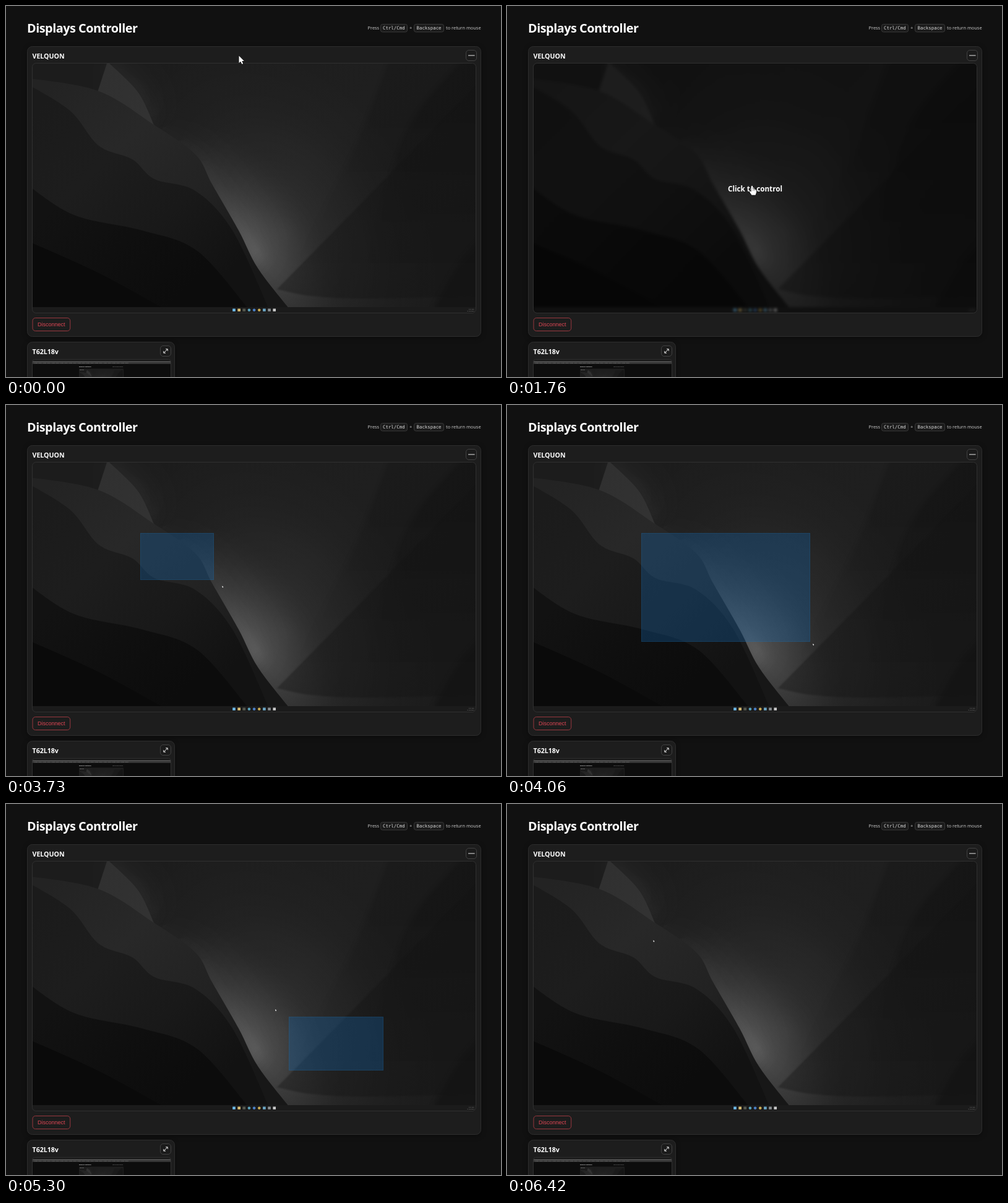
Recreate the animation shown at these times as an HTML page with a canvas. Size 800 px wide and 600 px high, loop 6450 ms.

```html
<!DOCTYPE html>
<html lang="en">
<head>
<meta charset="utf-8">
<title>Displays Controller</title>
<style>
html, body { margin: 0; width: 100%; height: 100%; overflow: hidden; background: #111; }
canvas, svg { position: absolute; left: 0; top: 0; width: 800px; height: 600px; display: block; }
text { font-family: "Noto Sans", "Open Sans", sans-serif; fill: #fff; }
.title { font-size: 19.8px; font-weight: 700; letter-spacing: -.46px; }
.name { font-size: 10.6px; font-weight: 700; }
.hint { font-size: 7.4px; fill: #c4c4c4; }
.key { font: 7.4px "DejaVu Sans Mono", "Noto Sans Mono", monospace; fill: #d8d8d8; }
.danger { font: 9px "Liberation Sans", sans-serif; fill: #dc4654; }
</style>
</head>
<body>
<canvas id="stage" width="800" height="600"></canvas>
<svg viewBox="0 0 800 600">
  <text class="title" x="34" y="43">Displays Controller</text>
  <text class="hint" x="584.5" y="38">Press</text>
  <text class="key" x="609" y="38">Ctrl/Cmd</text>
  <text class="hint" x="652" y="38">+</text>
  <text class="key" x="663.5" y="38">Backspace</text>
  <text class="hint" x="711" y="38">to return mouse</text>
  <text class="name" x="42.5" y="84.7">VELQUON</text>
  <text class="name" x="42.5" y="562.7">T62L18v</text>
  <text class="danger" x="51" y="518">Disconnect</text>
</svg>
<script>
const W = 800, H = 600, LOOP = 6450;
const VIEW = { x: 43, y: 93, w: 717, h: 403 };
const BAR_Y = 487;
const SANS = '"Noto Sans", "Open Sans", sans-serif';
const ctx = document.getElementById('stage').getContext('2d');

function layer(paint) {
  const c = document.createElement('canvas');
  c.width = W;
  c.height = H;
  paint(c.getContext('2d'));
  return c;
}

function box(g, x, y, w, h, r, fill, stroke) {
  g.beginPath();
  g.roundRect(x, y, w, h, r);
  if (fill) { g.fillStyle = fill; g.fill(); }
  if (stroke) { g.strokeStyle = stroke; g.lineWidth = 1; g.stroke(); }
}

function line(g, x0, y0, x1, y1, color, width = 1) {
  g.beginPath();
  g.moveTo(x0, y0);
  g.lineTo(x1, y1);
  g.strokeStyle = color;
  g.lineWidth = width;
  g.stroke();
}

function label(g, text, x, y, size, color, weight = '') {
  g.font = `${weight} ${size}px ${SANS}`;
  g.fillStyle = color;
  g.fillText(text, x, y);
}

function ramp(g, x0, y0, x1, y1, ...colors) {
  const grad = g.createLinearGradient(x0, y0, x1, y1);
  colors.forEach((c, i) => grad.addColorStop(i / (colors.length - 1), c));
  return grad;
}

// Smooth curve through a few points.
function curve(...pts) {
  const at = i => pts[Math.max(0, Math.min(pts.length - 1, i))];
  const path = new Path2D();
  path.moveTo(...pts[0]);
  for (let i = 0; i < pts.length - 1; i++) {
    const [a, b, c, d] = [at(i - 1), at(i), at(i + 1), at(i + 2)];
    path.bezierCurveTo(b[0] + (c[0] - a[0]) / 6, b[1] + (c[1] - a[1]) / 6,
      c[0] - (d[0] - b[0]) / 6, c[1] - (d[1] - b[1]) / 6, ...c);
  }
  return path;
}

// Fills the ground between a curve and one side of the stage.
function hill(g, path, side, fill, blur = 0) {
  const shape = new Path2D(path);
  shape.lineTo(side, 500);
  if (side > 400) shape.lineTo(side, 90);
  shape.closePath();
  g.filter = blur ? `blur(${blur}px)` : 'none';
  g.fillStyle = fill;
  g.fill(shape);
  g.filter = 'none';
}

// Light that spills from a ridge, in ever wider and weaker bands.
function spill(g, path, light) {
  for (let i = 0; i < 3; i++) {
    g.filter = `blur(${10 * 2 ** i}px)`;
    g.lineWidth = 14 * 2 ** i;
    g.strokeStyle = light;
    g.stroke(path);
  }
  g.filter = 'none';
}

function glow(g, x, y, rx, ry, level) {
  g.save();
  g.translate(x, y);
  g.rotate(Math.PI / 3);
  g.scale(rx, ry);
  const grad = g.createRadialGradient(0, 0, 0, 0, 0, 1);
  for (let i = 0; i <= 10; i++) {
    grad.addColorStop(i / 10, `rgba(255,255,255,${(level * (1 - i / 10) ** 1.6).toFixed(4)})`);
  }
  g.fillStyle = grad;
  g.fillRect(-1, -1, 2, 2);
  g.restore();
}

function wallpaper(g) {
  g.fillStyle = ramp(g, 230, 94, 700, 480, '#1c1c1c', '#1f1f1f', '#1b1b1b');
  g.fillRect(0, 0, W, H);
  const veil = a => ramp(g, 0, 150, 0, 420, `rgba(0,0,0,${a})`, 'rgba(0,0,0,0)');
  hill(g, curve([618, 90], [568, 220], [510, 335], [470, 420]), 800, veil(.12), 3);
  hill(g, curve([735, 90], [654, 190], [605, 330], [575, 490]), 800, veil(.14), 3);
  hill(g, curve([765, 380], [727, 425], [690, 492]), 800, 'rgba(0,0,0,.22)', 4);

  const far = curve([164, 90], [213, 139], [239, 192]);
  const ridge = curve([30, 116], [148, 137], [239, 192], [306, 240], [333, 288], [376, 363], [407, 424], [458, 490]);
  spill(g, far, 'rgba(255,255,255,.03)');
  spill(g, curve([239, 192], [306, 240], [333, 288], [376, 363], [407, 420]),
    ramp(g, 240, 190, 400, 410, 'rgba(255,255,255,.012)', 'rgba(255,255,255,.055)'));
  glow(g, 405, 395, 230, 110, .17);
  glow(g, 450, 365, 330, 230, .09);
  hill(g, curve([438, 458], [495, 469], [590, 473], [765, 468]), 800, 'rgba(20,20,20,.4)', 1);

  hill(g, far, 30, ramp(g, 60, 90, 225, 185, '#282828', '#303030', '#323232'));
  hill(g, ridge, 30, ramp(g, 90, 110, 400, 440, '#232323', '#282828', '#222222', '#171717'));
  hill(g, curve([30, 124], [103, 169], [150, 226], [204, 248], [240, 280], [306, 299], [366, 363], [425, 490]), 30,
    ramp(g, 70, 150, 350, 440, '#1b1b1b', '#1d1d1d', '#191919', '#121212'), .7);
  hill(g, curve([30, 286], [110, 338], [220, 363], [309, 396], [392, 490]), 30,
    ramp(g, 80, 320, 260, 490, '#121212', '#0c0c0c'));
  hill(g, curve([30, 378], [146, 430], [256, 490]), 30, '#0a0a0a');
}

function taskbar(g) {
  g.fillStyle = '#1b1b1b';
  g.fillRect(VIEW.x, BAR_Y, VIEW.w, 10);
  const colors = ['#6db9e8', '#d9bd72', '#55584f', '#58a0b8', '#4a7ec4', '#c9a950', '#6ba6c6', '#8a8f92', '#c9c9c9'];
  colors.forEach((color, i) => box(g, 366.2 + i * 8.15, 489.5, 4.6, 4.4, i > 2 && i < 6 ? 2.2 : 0, color));
  g.textAlign = 'right';
  label(g, '4:27 PM', 756.5, 491.2, 2.4, '#aaa');
  label(g, '3/14/2024', 756.5, 494.4, 2.4, '#aaa');
  g.textAlign = 'left';
}

function miniScreen(g) {
  g.save();
  box(g, 43, 571.5, 223, 60, 4, '#0d0d0d');
  g.clip();
  g.fillStyle = '#353535';
  g.fillRect(43, 574, 224, 5);
  g.fillStyle = '#171717';
  g.fillRect(43, 571, 224, 3);
  line(g, 43, 575.3, 267, 575.3, '#777', .6);
  for (let x = 45; x < 195; x += 14) label(g, 'Notes  Tasks', x, 578.4, 2.2, '#9a9a9a');
  label(g, 'Displays Controller', 118, 584.2, 2.1, '#fff', 'bold');
  label(g, 'Press Ctrl/Cmd to return', 172, 584, 1.5, '#aaa');
  box(g, 118, 586.5, 72, 40, 1, '#1e1e1e');
  label(g, 'VELQUON', 119, 588.5, 1.5, '#ddd');
  g.drawImage(paper, VIEW.x, VIEW.y, VIEW.w, BAR_Y - VIEW.y, 119, 589, 70, 39);
  g.restore();
  box(g, 42.5, 571.5, 224, 60, 4, null, '#303030');
}

function card(g, y, w, h) {
  g.save();
  g.shadowColor = 'rgba(0,0,0,.4)';
  g.shadowBlur = 9;
  g.shadowOffsetY = 2;
  box(g, 34.5, y, w, h, 8, '#1d1d1d');
  g.restore();
  box(g, 34.5, y, w, h, 8, null, '#2d2d2d');
}

function expandIcon(g, x, y) {
  line(g, x - 3, y + 3, x + 3, y - 3, '#e8e8e8');
  for (const s of [-1, 1]) {
    line(g, x + 3.2 * s, y - 3.2 * s, x, y - 3.2 * s, '#e8e8e8');
    line(g, x + 3.2 * s, y - 3.2 * s, x + 3.2 * s, y, '#e8e8e8');
  }
}

function chrome(g) {
  g.fillStyle = '#111';
  g.fillRect(0, 0, W, H);
  card(g, 65.5, 733, 469);
  card(g, 543.5, 238, 120);
  box(g, 605.5, 29.5, 43, 12.5, 3, '#1b1b1b', '#393939');
  box(g, 659.5, 29.5, 48, 12.5, 3, '#1b1b1b', '#393939');
  box(g, 743.5, 71.5, 17, 17, 4.5, '#1b1b1b', '#414141');
  line(g, 747, 80, 757.5, 80, '#d5d5d5', 1.1);
  box(g, 249.5, 549.5, 17, 17, 4.5, '#1b1b1b', '#414141');
  expandIcon(g, 258, 558);
  box(g, 43, 504.5, 60.7, 21, 4.5, null, '#98383f');
  miniScreen(g);
}

const paper = layer(wallpaper);
const desktop = layer(g => { g.drawImage(paper, 0, 0); taskbar(g); });
const dimmed = layer(g => {
  g.filter = 'blur(2px)';
  g.drawImage(desktop, 0, 0);
  g.filter = 'none';
  g.fillStyle = 'rgba(0,0,0,.4)';
  g.fillRect(0, 0, W, H);
});
const page = layer(chrome);

const clamp = v => Math.max(0, Math.min(1, v));
const ease = v => v * v * (3 - 2 * v);
const progress = (t, from, to) => ease(clamp((t - from) / (to - from)));

// Eased moves, one after the other.
const HOVER = { x: 376.5, y: 80.5, moves: [{ from: 60, to: 1000, x: 396, y: 291 }] };
const REMOTE = {
  x: 398, y: 297,
  moves: [
    { from: 2030, to: 2960, x: 224.5, y: 212 },
    { from: 2980, to: 3300, x: 217, y: 207 },
    { from: 3380, to: 4110, x: 498, y: 388 },
    { from: 4110, to: 4400, x: 592, y: 432 },
    { from: 4430, to: 4620, x: 578, y: 421 },
    { from: 4640, to: 4900, x: 610, y: 431 },
    { from: 5000, to: 5650, x: 217, y: 208 },
    { from: 6030, to: 6410, x: 236.5, y: 220 }
  ]
};
const DRAGS = [[3380, 4430], [5000, 5920]];
const DRAG_LAG = 24;

function position({ x, y, moves }, t) {
  for (const m of moves) {
    const p = progress(t, m.from, m.to);
    x += (m.x - x) * p;
    y += (m.y - y) * p;
  }
  return [x, y];
}

const ARROW = new Path2D('M0 0V11.8L2.7 9.3L4.7 13.6L6.7 12.7L4.8 8.5H8.4Z');
const HAND = new Path2D('M-1.3 1Q0-2 1.3 1V5Q2.5 4.3 3.4 5.4Q4.6 4.8 5.4 6Q7.2 5.7 7.2 7.5V10L5.6 14.8H-.6L-3.6 10.3Q-5 7-1.3 9.2Z');

function pointer(shape, [x, y], scale) {
  ctx.save();
  ctx.translate(x, y);
  ctx.scale(scale, scale);
  ctx.lineWidth = 1;
  ctx.strokeStyle = '#000';
  ctx.stroke(shape);
  ctx.fillStyle = '#fff';
  ctx.fill(shape);
  if (shape === HAND) {
    for (let i = 0; i < 3; i++) line(ctx, 1.3 + 2 * i, 5.4, 1.3 + 2 * i, 8, '#444', .5);
  }
  ctx.restore();
}

function selection(t) {
  const drag = DRAGS.find(d => t >= d[0] && t < d[1]);
  if (!drag) return;
  const [ax, ay] = position(REMOTE, drag[0]).map(Math.round);
  const [bx, by] = position(REMOTE, t - DRAG_LAG).map(Math.round);
  const x = Math.min(ax, bx), y = Math.min(ay, by);
  const w = Math.abs(ax - bx), h = Math.abs(ay - by);
  if (w < 2 || h < 2) return;
  ctx.fillStyle = 'rgba(20,98,168,.33)';
  ctx.fillRect(x, y, w, h);
  ctx.strokeStyle = 'rgba(30,120,190,.18)';
  ctx.lineWidth = 1;
  ctx.strokeRect(x + .5, y + .5, w - 1, h - 1);
}

function render(t) {
  const shade = progress(t, 160, 360) - progress(t, 1790, 1940);
  ctx.drawImage(page, 0, 0);
  ctx.save();
  ctx.beginPath();
  ctx.roundRect(VIEW.x, VIEW.y, VIEW.w, VIEW.h, 6);
  ctx.clip();
  ctx.drawImage(desktop, 0, 0);
  selection(t);
  if (shade > 0) {
    ctx.globalAlpha = shade;
    ctx.drawImage(dimmed, 0, 0);
    ctx.textAlign = 'center';
    label(ctx, 'Click to control', 401, 300, 11.7, '#fff', 'bold');
  }
  ctx.restore();
  box(ctx, 42.5, 92.5, 717, 404, 6, null, '#303030');
  if (t < 1800) {
    const p = position(HOVER, t);
    pointer(p[1] < VIEW.y ? ARROW : HAND, p, 1);
  } else if (t >= 2030) {
    pointer(ARROW, position(REMOTE, t), .26);
  }
}

const start = performance.now();
function tick() {
  render((performance.now() - start) % LOOP);
  requestAnimationFrame(tick);
}
tick();
</script>
</body>
</html>
```
